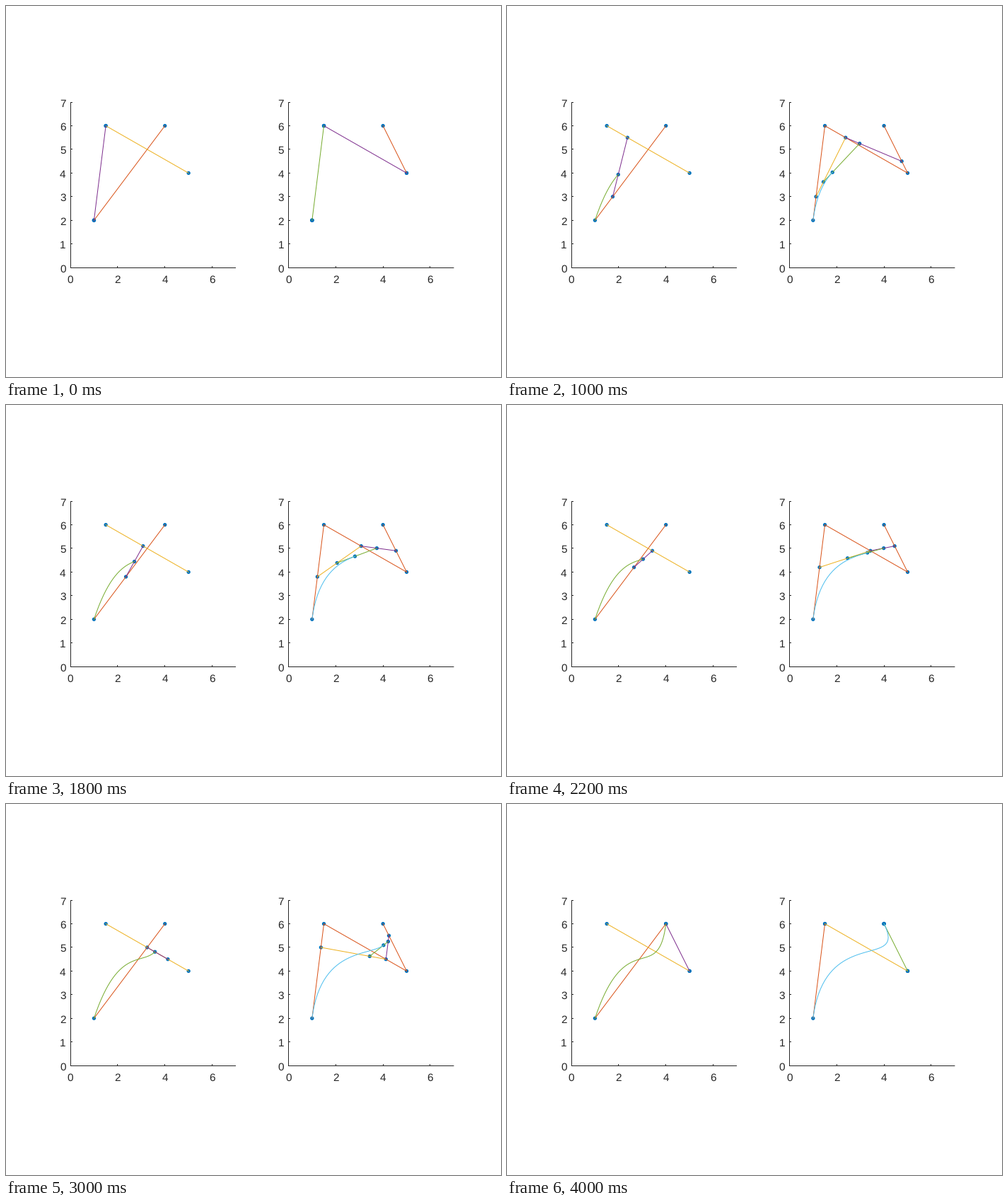
Animation of 700 by 525 pixels, one loop 4100 ms. Source, as a matplotlib script:

```python
import numpy as np
import matplotlib.pyplot as plt
from matplotlib.animation import FuncAnimation

W, H, DPI = 700, 525, 100
PX = 72 / DPI                      # one pixel in points
FRAMES = 41
UNIT, Y0 = 33.43, 370.1
LEFT, RIGHT = 91.0, 399.4          # x of each plot's origin
INK = "#262626"
BLUE, RED, YELLOW, PURPLE, GREEN, CYAN = (
    "#0072BD", "#D95319", "#EDB120", "#7E2F8E", "#77AC30", "#4DBEEE")

P = np.array([[1, 2], [1.5, 6], [5, 4], [4, 6]], float)

plt.rcParams["text.hinting"] = "none"
fig = plt.figure(figsize=(W / DPI, H / DPI), dpi=DPI, facecolor="white")
ax = fig.add_axes([0, 0, 1, 1])
ax.set_xlim(0, W)
ax.set_ylim(H, 0)
ax.axis("off")


def lerp(a, b, t):
    return a + (b - a) * t


def to_px(points, x0):
    p = np.asarray(points, float).reshape(-1, 2)
    return x0 + UNIT * p[:, 0], Y0 - UNIT * p[:, 1]


def mid(v):
    """Centre of the pixel that holds v."""
    return np.floor(v) + 0.5


def draw_axes(x0):
    left, base = mid(x0), mid(Y0)

    def rule(xs, ys):
        ax.plot(xs, ys, color=INK, lw=PX, snap=False,
                solid_capstyle="butt", zorder=1)

    def label(x, y, n):
        ax.text(x, y, str(n), family="Liberation Sans", size=15.4 * PX,
                color=INK, ha="center", va="baseline")

    rule([left, left], [Y0 - 7 * UNIT, base + 0.5])
    rule([left - 0.5, x0 + 7 * UNIT], [base, base])
    for n in range(8):
        y = mid(Y0 - n * UNIT)
        rule([left, left + 2.5], [y, y])
        label(x0 - 10.6, y + 6.7, n)
    for n in range(0, 8, 2):
        x = mid(x0 + n * UNIT)
        rule([x, x], [base, base - 2.5])
        label(x0 + n * UNIT, base + 21.2, n)


def make_dots(count):
    # One size per dot keeps each dot at its sub-pixel place.
    sizes = np.full(count, (5.3 * PX) ** 2)
    return ax.scatter(np.zeros(count), np.zeros(count), s=sizes,
                      color=BLUE, linewidths=0, zorder=2)


def make_lines(*colors):
    return [ax.plot([], [], color=c, lw=PX, zorder=3)[0] for c in colors]


def cross_blend(t):
    """Points on the two crossing segments and their blended point."""
    a = lerp(P[0], P[3], t)
    b = lerp(P[1], P[2], t)
    return a, b, lerp(a, b, 2 * t * (1 - t))


def casteljau(t):
    a, b, c = (lerp(P[k], P[k + 1], t) for k in range(3))
    d, e = lerp(a, b, t), lerp(b, c, t)
    return a, b, c, d, e, lerp(d, e, t)


def drop_covered(segments):
    """Empty each segment that a later one covers exactly."""
    return [[] if any(np.array_equal(s, later) for later in segments[k + 1:])
            else s for k, s in enumerate(segments)]


draw_axes(LEFT)
draw_axes(RIGHT)
left_dots, right_dots = make_dots(7), make_dots(10)
left_lines = make_lines(RED, YELLOW, PURPLE, GREEN)
right_lines = make_lines(RED, RED, RED, YELLOW, PURPLE, GREEN, CYAN)


def show(dots, lines, x0, points, paths):
    dots.set_offsets(np.column_stack(to_px(np.vstack([P, points]), x0)))
    for line, path in zip(lines, paths):
        line.set_data(*to_px(path, x0))


def update(i):
    t = i / (FRAMES - 1)
    past = np.arange(i + 1) / (FRAMES - 1)

    pts = cross_blend(t)
    trail = [cross_blend(s)[-1] for s in past]
    show(left_dots, left_lines, LEFT, pts,
         [P[[0, 3]], P[[1, 2]], pts[:2], trail])

    pts = casteljau(t)
    trail = [casteljau(s)[-1] for s in past]
    segments = [P[0:2], P[1:3], P[2:4], pts[0:2], pts[1:3], pts[3:5]]
    show(right_dots, right_lines, RIGHT, pts,
         drop_covered(segments) + [trail])
    return [left_dots, right_dots, *left_lines, *right_lines]


anim = FuncAnimation(fig, update, frames=FRAMES, interval=100,
                     repeat=True, repeat_delay=0, blit=False)
plt.show()
```
